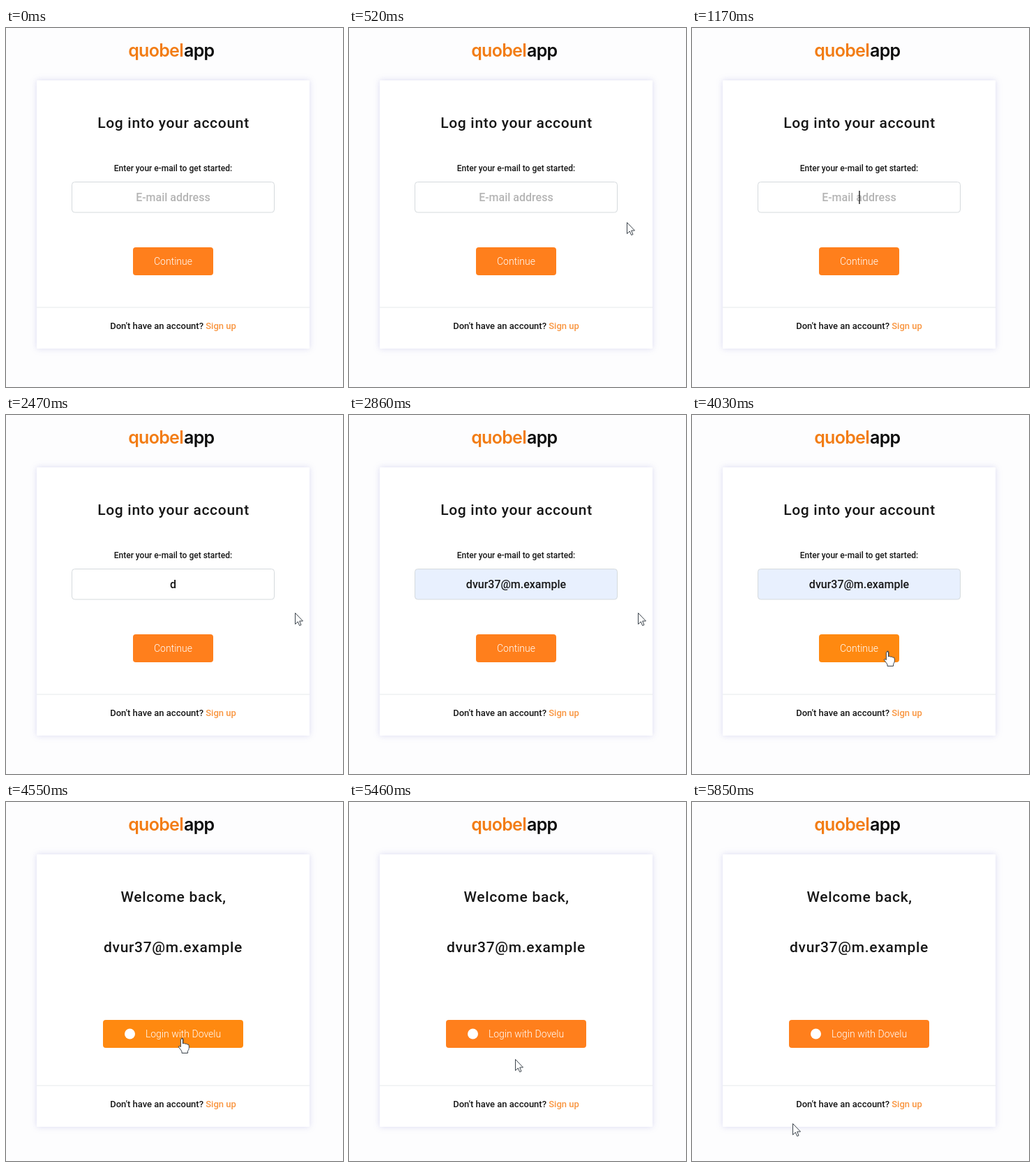
These frames come from a looping animation (483 px wide and 514 px high, 5980 ms). An HTML page:

```html
<!DOCTYPE html>
<html lang="en">
<head>
<meta charset="utf-8">
<title>Log in</title>
<style>
  html, body { margin: 0; width: 100%; height: 100%; overflow: hidden; background: #fdfdfe; }
  svg { display: block; width: 100%; height: 100%; }
  text { font: 500 16px Roboto, sans-serif; fill: #161616; text-anchor: middle; }
  .logo { font: 600 25px Inter, sans-serif; letter-spacing: -.7px; text-anchor: start; fill: #0b0b0b; }
  .logo.tint { fill: #f27c14; text-anchor: end; }
  .title { font-size: 21px; letter-spacing: .68px; }
  .label { font-size: 12px; }
  .foot { font-size: 13px; }
  .foot tspan { fill: #f9953f; }
  .action { font-size: 14px; font-weight: 300; fill: #fff; }
  .card { fill: #fff; filter: drop-shadow(0 0 5px rgba(80, 80, 190, .2)); }
  .button { fill: #ff7f1c; }
  .hover .button { fill: #ff8910; }
  .hint { fill: #b4b4b4; }
</style>
</head>
<body>
<svg viewBox="0 0 483 514">
  <text class="logo tint" x="254" y="41">quobel</text>
  <text class="logo" x="255" y="41">app</text>
  <rect id="card" class="card" x="44" y="75" width="391" height="384"/>

  <g id="login">
    <text class="title" x="240" y="143">Log into your account</text>
    <text class="label" x="239.5" y="205">Enter your e-mail to get started:</text>
    <rect id="field" x="94.5" y="220.5" width="290" height="43.5" rx="4" stroke="#d5dadd"/>
    <text id="entry" x="239.5" y="248"></text>
    <rect id="caret" y="233" width="1.3" height="19" fill="#111"/>
    <rect class="button" x="182" y="314" width="115" height="40" rx="4"/>
    <text class="action" x="239.5" y="338.5">Continue</text>
  </g>

  <g id="welcome">
    <text class="title" x="240" y="143">Welcome back,</text>
    <text id="email" class="title" x="239.5" y="215"></text>
    <rect class="button" x="139" y="312" width="201" height="40" rx="4"/>
    <circle cx="177.5" cy="332" r="7.5" fill="#fff"/>
    <text class="action" x="254" y="336.5">Login with Dovelu</text>
  </g>

  <g id="footer">
    <path d="M44 400H435" stroke="#e6e9eb"/>
    <text class="foot" x="239.5" y="430.5">Don't have an account? <tspan>Sign up</tspan></text>
  </g>

  <g id="pointer" stroke="#3c444c" fill="#fff" stroke-linejoin="round">
    <path id="arrow" d="M.5.5V16.5L4.3 13 6.7 18.5 9 17.5 6.7 12H11.5Z"/>
    <path id="hand" d="M-1.2 1.5Q0-.8 1.4 1.5V8Q3-.8 0 0M-1.6 2Q0-1 1.6 2V8Q3.2 6.5 4.6 8.3 6.3 7.2 7.4 9 9.8 8 10.3 11V14.5Q10 17 8.5 18.5V21.5H0V19L-4.4 13Q-5.3 10.3-1.6 12.5Z"/>
  </g>
</svg>
<script>
const LOOP = 5980, STEP = 130, EMAIL = 'dvur37@m.example';
const $ = id => document.getElementById(id);
const show = (id, on) => $(id).setAttribute('display', on ? 'inline' : 'none');
const within = (t, a, b) => t >= a && t < b;

// Pointer trips: each is a list of [ms, x, y]; the last point ends the trip.
const trips = [
  [[390, 466, 312], [520, 398, 278], [650, 390, 268], [780, 390, 268]],
  [[2340, 402, 274], [2470, 414, 283], [3120, 414, 283], [3380, 402, 271], [3510, 412, 281],
   [3640, 412, 281], [3770, 380, 306], [4030, 280, 338], [4420, 280, 338], [4550, 252, 338],
   [5330, 252, 338], [5460, 238, 368], [5850, 144, 460], [LOOP, 144, 460]]
];

function pointerAt(t) {
  const trip = trips.find(p => within(t, p[0][0], p[p.length - 1][0]));
  if (!trip) return null;
  const i = trip.findIndex(p => p[0] > t);
  const [t0, x0, y0] = trip[i - 1], [t1, x1, y1] = trip[i];
  const k = (t - t0) / (t1 - t0);
  return [x0 + (x1 - x0) * k, y0 + (y1 - y0) * k];
}

$('email').textContent = EMAIL;

function draw(now) {
  const t = Math.floor(now % LOOP / STEP) * STEP;
  const second = t >= 4420, filled = t >= 2600;

  show('login', !second);
  show('welcome', second);
  $('card').setAttribute('height', second ? 390 : 384);
  $('footer').setAttribute('transform', `translate(0 ${second ? 6 : 0})`);

  const entry = $('entry');
  entry.textContent = filled ? EMAIL : t >= 2470 ? EMAIL[0] : 'E-mail address';
  entry.setAttribute('class', t < 2470 ? 'hint' : '');
  $('field').setAttribute('fill', filled ? '#e8f0fe' : '#fff');
  $('caret').setAttribute('x', filled ? 310.5 : 239.3);
  show('caret', within(t, 1170, 1560) || within(t, 2210, 2470) ||
    within(t, 2600, 2860) || within(t, 3380, 3900));

  const hover = within(t, 4030, 5460);
  $('login').setAttribute('class', hover ? 'hover' : '');
  $('welcome').setAttribute('class', hover ? 'hover' : '');

  const at = pointerAt(t);
  show('pointer', at);
  show('arrow', !hover);
  show('hand', hover);
  if (at) $('pointer').setAttribute('transform', `translate(${at})`);
}

const start = performance.now();
(function tick() {
  draw(performance.now() - start);
  requestAnimationFrame(tick);
})();
</script>
</body>
</html>
```
